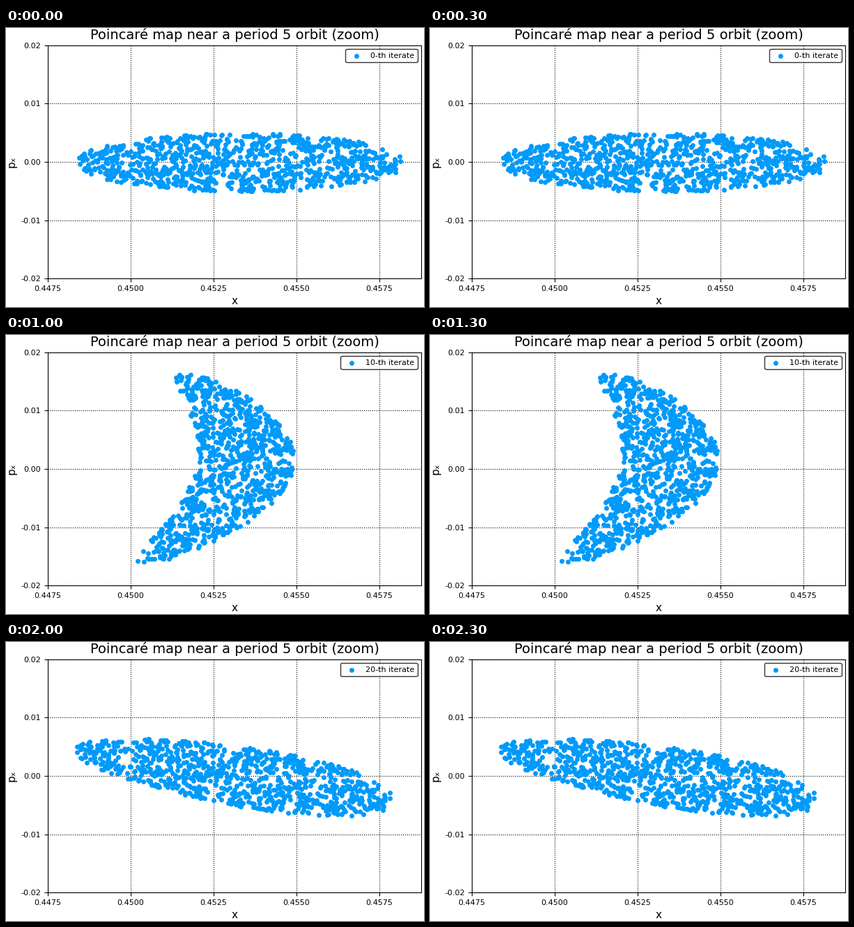
Animation, 600 px wide and 400 px high, one loop 2.5 s. Source, as a matplotlib script:

```python
import numpy as np
import matplotlib.pyplot as plt
from matplotlib.animation import FuncAnimation

W, H, DPI = 600, 400, 100
LEFT, RIGHT, TOP, BOTTOM = 60, 596.06, 24.6, 359.2
X0, X_PER_PX = 0.4475, 0.0025 / 118.9
Y_MAX = 0.02
BLUE = "#009AFA"
COUNT = 950

plt.rcParams["font.family"] = "DejaVu Sans"


def cloud(middle, along, across, bend=(0, 0), taper=0.0, seed=0):
    """Even random points in a bent, tapered ellipse, in data units.

    The vectors are in stage pixels; `taper` widens the far end.
    """
    rng = np.random.default_rng(seed)
    n = 3 * COUNT
    radius, angle = np.sqrt(rng.random(n)), rng.uniform(0, 2 * np.pi, n)
    u, v = radius * np.cos(angle), radius * np.sin(angle)
    # Keep more points where the shape is wider, so the density stays even
    keep = rng.random(n) * (1 + taper) < 1 + taper * u
    u, v = u[keep][:COUNT], v[keep][:COUNT]
    x, y = (m + u * a + v * (1 + taper * u) * c + u**2 * b
            for m, a, c, b in zip(middle, along, across, bend))
    return np.column_stack([
        X0 + (x - LEFT) * X_PER_PX,
        Y_MAX - (y - TOP) * 2 * Y_MAX / (BOTTOM - TOP)])


clouds = [
    cloud((337.5, 192.5), (237, 0), (0, 42)),
    cloud((291, 166), (168, 98), (26, -41), bend=(3, 27), taper=0.7),
    cloud((342, 192), (-32, 138), (70, 0), bend=(-118, 0)),
    cloud((307, 199), (203, -71), (15, 42), taper=0.42),
    cloud((328, 191), (231, 36), (-6, 42), taper=0.15),
]

fig = plt.figure(figsize=(W / DPI, H / DPI), dpi=DPI, facecolor="white")
ax = fig.add_axes([LEFT / W, 1 - BOTTOM / H,
                   (RIGHT - LEFT) / W, (BOTTOM - TOP) / H])
ax.set_xlim(X0, X0 + (RIGHT - LEFT) * X_PER_PX)
ax.set_ylim(-Y_MAX, Y_MAX)
xticks = X0 + 0.0025 * np.arange(5)
yticks = np.linspace(-Y_MAX, Y_MAX, 5)
ax.set_xticks(xticks, [f"{v:.4f}" for v in xticks])
ax.set_yticks(yticks, [f"{v:.2f}" for v in yticks])
ax.tick_params(labelsize=8)
ax.set_axisbelow(True)
ax.grid(True, color="black", linestyle=":", linewidth=0.8)
ax.set_title("Poincaré map near a period 5 orbit (zoom)", fontsize=14)
ax.set_xlabel("x", fontsize=11)
ax.set_ylabel("pₓ", fontsize=11)

dots = ax.scatter(*clouds[0].T, s=16, color=BLUE, linewidths=1,
                  label="0-th iterate")
legend = ax.legend(loc="upper right", fontsize=8, scatterpoints=1,
                   edgecolor="black")
label = legend.get_texts()[0]


def update(i):
    dots.set_offsets(clouds[i])
    label.set_text(f"{5 * i}-th iterate")
    return dots, label


anim = FuncAnimation(fig, update, frames=len(clouds), interval=500,
                     init_func=lambda: update(0), repeat=True, repeat_delay=0)
plt.show()
```
